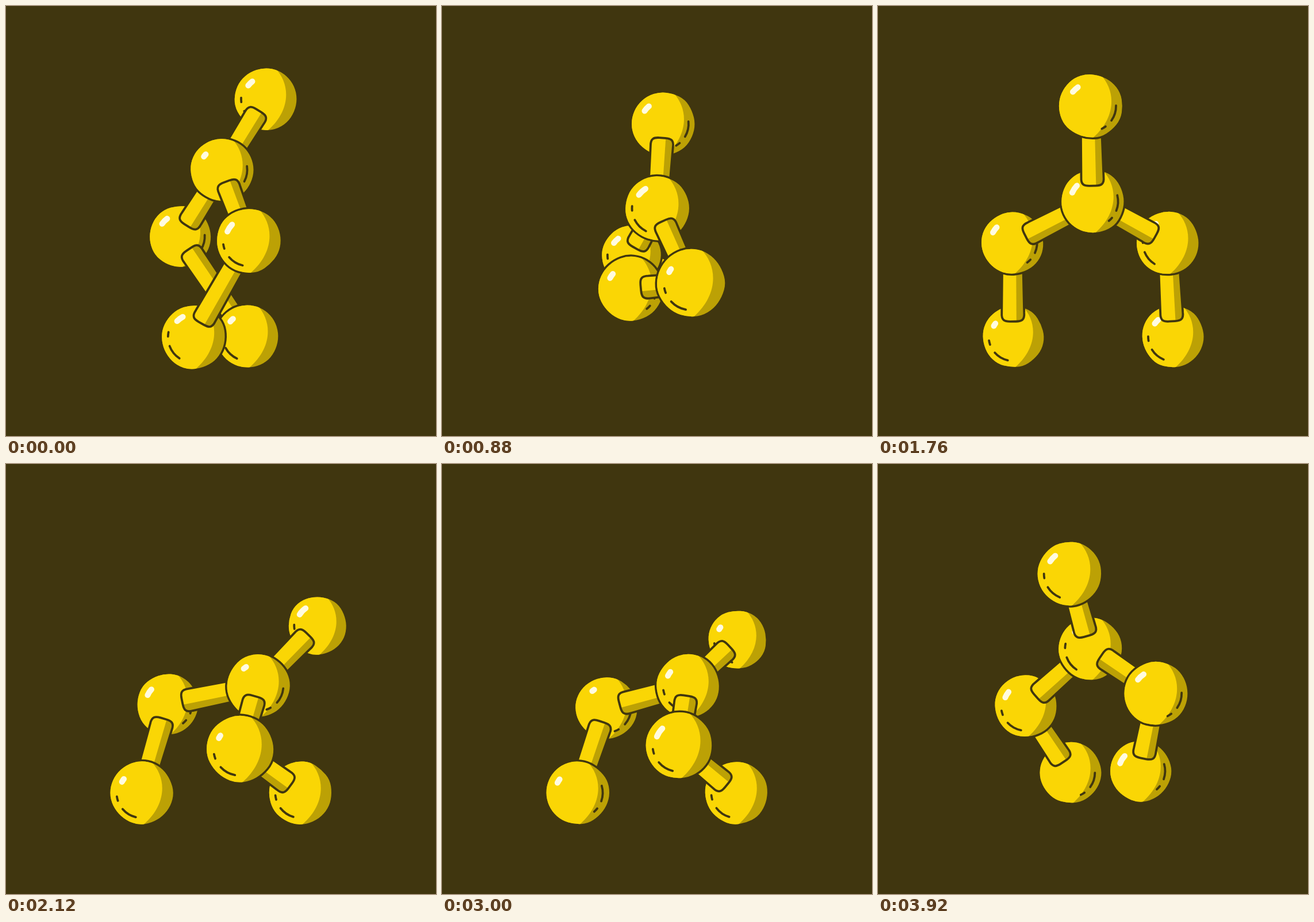
These frames come from a looping animation (748x748 px, 4000 ms). An HTML page with a canvas:

```html
<!DOCTYPE html>
<html lang="en">
<head>
<meta charset="utf-8">
<title>Dancing molecule</title>
<style>
  html, body { margin: 0; width: 100%; height: 100%; overflow: hidden; background: #40360f; }
  canvas { display: block; width: 100vw; height: 100vh; }
</style>
</head>
<body>
<canvas id="stage" width="748" height="748"></canvas>
<script>
const ctx = document.getElementById('stage').getContext('2d');
const LOOP = 4000, SIZE = 748, MID = SIZE / 2, STEP = 80, RADIUS = 54.5, TAU = Math.PI * 2;
const INK = '#40360f', LIT = '#fad605', SHADE = '#bca105', SHINE = '#fffbe0';

// A pose lists head, hip, left knee, right knee, left foot, right foot as x, y, depth.
const BONES = [[0, 1], [1, 2], [1, 3], [2, 4], [3, 5]];

// Open legs: stretch below zero is a crouch, lift raises the whole body.
function stance(stretch, lift = 0) {
  const knee = 135 - 24 * stretch, kneeY = 412 - 18 * stretch - lift, footY = 575 - lift;
  return [
    [MID - 4, 174 - 50 * stretch - lift, 15],
    [MID, 340 - 35 * stretch - lift, 0],
    [MID - 5 - knee, kneeY, -30], [MID - 5 + knee, kneeY, -10],
    [MID - 139, footY, -40], [MID + 139, footY, -20]
  ];
}

// Mid-air tuck, leaning left (-1) or right (1).
const tuck = lean => [
  [MID - 1 + 40 * lean, 178 - 13 * lean, 25],
  [MID - 5, 321, 0],
  [257, 421, -25], [484, 399, -20 * lean],
  [335, 537, -25 + 20 * lean], [457, 534, -40]
];

// Side-to-side swing over planted feet.
function sway(t) {
  const a = Math.PI * (t - 2610) / 480, c = Math.cos(a);
  return [
    [MID - 168 * c, 277 - 31 * Math.sin(2 * a), -120],
    [MID - 65 * c, 386, 0],
    [MID - 63 + 30 * c, 457 + 39 * c, 20 + 60 * c],
    [MID + 63 + 30 * c, 457 - 39 * c, 20 - 60 * c],
    [MID - 138, 572, 0], [MID + 138, 572, 0]
  ];
}

const crossed = [[452, 162, -20], [376, 285, 0], [303, 401, -30], [422, 408, 30], [420, 574, -10], [326, 576, 20]];
const curled = [[385, 205, 10], [375, 352, 30], [329, 434, -90], [433, 482, 110], [425, 477, -120], [328, 492, 40]];

const keys = [
  [0, crossed], [160, stance(0.3, 15)], [360, tuck(1)], [560, stance(-1)],
  [720, stance(0.1)], [880, curled], [1040, stance(-0.2)], [1280, stance(0.25)],
  [1480, stance(0)], [1760, stance(0)], [1880, stance(-0.7)]
];
for (let t = 2040; t <= 3640; t += STEP) keys.push([t, sway(t)]);
keys.push([3920, tuck(-1)]);

function keyAt(i) {
  const n = keys.length, turn = Math.floor(i / n), [time, pose] = keys[i - turn * n];
  return [time + turn * LOOP, pose];
}

// Smooth curve through the key poses.
function poseAt(t) {
  let i = keys.length - 1;
  while (keys[i][0] > t) i--;
  const [a, b, c, d] = [-1, 0, 1, 2].map(k => keyAt(i + k));
  const h = c[0] - b[0], u = (t - b[0]) / h, v = 1 - u;
  return b[1].map((joint, j) => joint.map((p, k) => {
    const q = c[1][j][k];
    const m0 = (q - a[1][j][k]) / (c[0] - a[0]) * h;
    const m1 = (d[1][j][k] - p) / (d[0] - b[0]) * h;
    return p * (1 + 2 * u) * v * v + m0 * u * v * v + q * u * u * (3 - 2 * u) - m1 * u * u * v;
  }));
}

// Drawn in short steps; the step grid restarts at these times, with two holds.
const STARTS = [0, 360, 400, 1480, 1760, 1800, 3760];
function stepTime(t) {
  if (t >= 1040 && t < 1200) return 1040;
  if (t >= 1480 && t < 1760) return 1480;
  const start = STARTS.filter(s => s <= t).pop();
  return start + Math.floor((t - start) / STEP) * STEP;
}

function noise(n) {
  const s = Math.sin(n * 12.9898 + 4.1) * 43758.5453;
  return s - Math.floor(s);
}

const radius = z => RADIUS / (1 - z / 1500);

// Hand-cut circle with a slightly uneven edge.
function blob(r, seed) {
  const n = 15, path = new Path2D();
  const point = i => {
    const a = i / n * TAU, k = r * (1.02 + 0.035 * (noise(seed + i % n) - 0.5));
    return [Math.cos(a) * k, Math.sin(a) * k];
  };
  const between = i => {
    const p = point(i), q = point(i + 1);
    return [(p[0] + q[0]) / 2, (p[1] + q[1]) / 2];
  };
  path.moveTo(...between(0));
  for (let i = 1; i <= n; i++) path.quadraticCurveTo(...point(i), ...between(i));
  path.closePath();
  return path;
}

function arc(r, middle, span, width, color) {
  const a = middle * Math.PI / 180, half = span * Math.PI / 360;
  ctx.beginPath();
  ctx.arc(0, 0, r, a - half, a + half);
  ctx.lineWidth = width;
  ctx.strokeStyle = color;
  ctx.stroke();
}

function drawBall([x, y, z], seed) {
  const r = radius(z), outline = blob(r, seed);
  ctx.save();
  ctx.translate(x, y);
  ctx.lineWidth = 7;
  ctx.strokeStyle = INK;
  ctx.stroke(outline);
  ctx.fillStyle = SHADE;
  ctx.fill(outline);

  ctx.save();
  ctx.clip(outline);
  ctx.scale(r, r);
  ctx.beginPath();
  ctx.moveTo(0.2, -1.1);
  ctx.bezierCurveTo(0.84, -0.55, 0.84, 0.4, -0.02, 1.08);
  ctx.lineTo(-1.2, 1.2);
  ctx.lineTo(-1.2, -1.2);
  ctx.fillStyle = LIT;
  ctx.fill();
  ctx.restore();

  const tilt = noise(seed + 31) * 24 - 12;
  arc(r * 0.72, 222 + tilt, 6 + 18 * noise(seed + 37), 10, SHINE);
  const [long, short] = noise(seed + 47) < 0.6 ? [130, 175] : [12, 54];
  arc(r * 0.8, long + tilt, 36, 3.8, INK);
  arc(r * 0.8, short + tilt, 10, 3.8, INK);
  ctx.restore();
}

// The rod ends in a rounded cap on the farther ball.
function drawRod(near, far) {
  const dx = near[0] - far[0], dy = near[1] - far[1], len = Math.hypot(dx, dy);
  const tip = radius(far[2]) * 0.5 * Math.min(1, len / 165);
  const thin = 17.5, wide = 19.5, neck = tip + 15;
  const rod = new Path2D();
  rod.moveTo(len, -thin);
  rod.lineTo(neck, -wide);
  rod.bezierCurveTo(tip + 2, -wide - 1, tip, -wide + 5, tip, -5);
  rod.lineTo(tip, 5);
  rod.bezierCurveTo(tip, wide - 5, tip + 2, wide + 1, neck, wide);
  rod.lineTo(len, thin);

  ctx.save();
  ctx.translate(far[0], far[1]);
  ctx.rotate(Math.atan2(dy, dx));
  ctx.fillStyle = LIT;
  ctx.fill(rod);
  ctx.save();
  ctx.clip(rod);
  const shadeBelow = 0.8 * dx > dy;
  ctx.fillStyle = SHADE;
  ctx.fillRect(tip, shadeBelow ? 6 : -30, len, 24);
  ctx.restore();
  ctx.lineWidth = 3.8;
  ctx.strokeStyle = INK;
  ctx.stroke(rod);
  ctx.restore();
}

// Paint from back to front.
function draw(t) {
  const pose = poseAt(t);
  const items = pose.map((p, i) => ({ z: p[2], paint: () => drawBall(p, t * 0.37 + i * 101) }));
  for (const [i, j] of BONES) {
    const [far, near] = [pose[i], pose[j]].sort((a, b) => a[2] - b[2]);
    items.push({ z: (far[2] + near[2]) / 2, paint: () => drawRod(near, far) });
  }
  ctx.fillStyle = INK;
  ctx.fillRect(0, 0, SIZE, SIZE);
  items.sort((a, b) => a.z - b.z).forEach(item => item.paint());
}

ctx.lineCap = ctx.lineJoin = 'round';
const began = performance.now();
let last = -1;
function tick() {
  const t = stepTime((performance.now() - began) % LOOP);
  if (t !== last) draw(last = t);
  requestAnimationFrame(tick);
}
tick();
</script>
</body>
</html>
```
